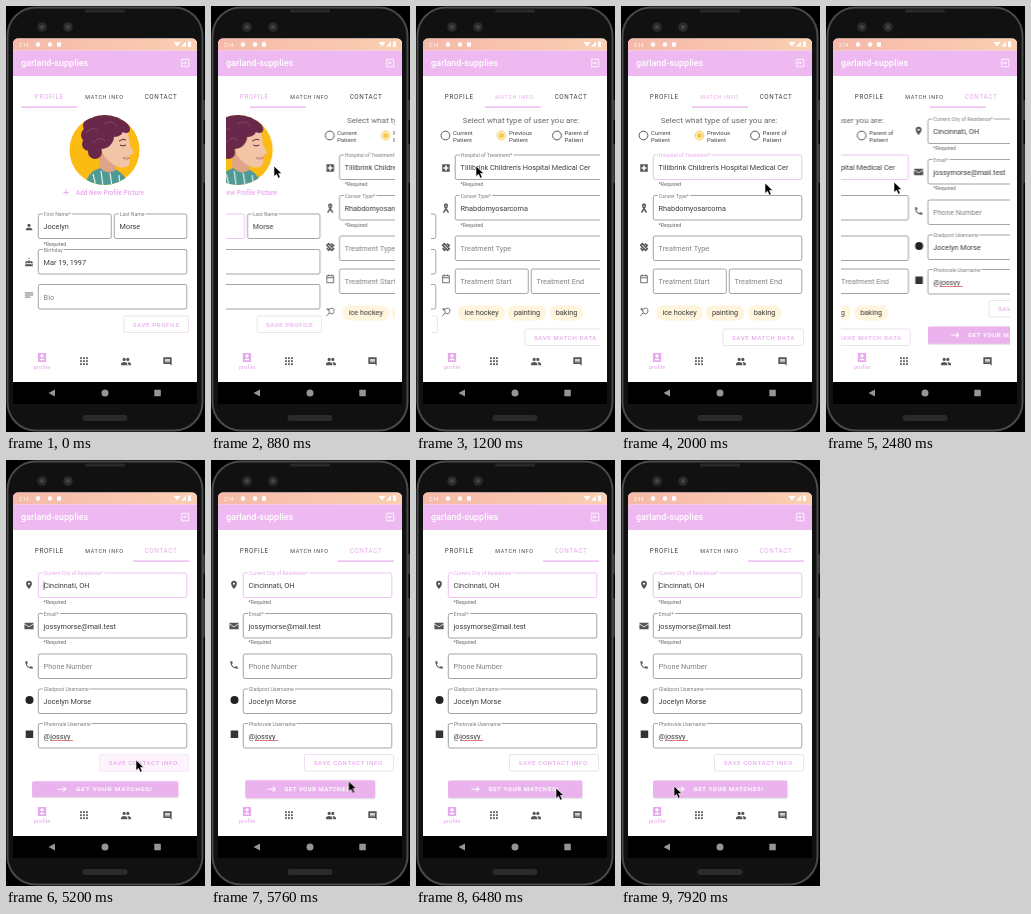
An HTML page that plays this animation: 199 px wide and 426 px high, repeating every 8000 ms.

```html
<!DOCTYPE html>
<html lang="en">
<head>
<meta charset="utf-8">
<title>Profile set-up</title>
<style>
html, body { margin: 0; width: 100%; height: 100%; overflow: hidden; background: #000; }
svg { display: block; width: 100%; height: 100%; font-family: Roboto, sans-serif; }
:root { --pink: #e7a9ec; --dark: #444; --line: #7d7d7d; }

/* One percent of the loop is 80 ms. */
.pages, .bar, .tab, .focus, .caret, .press, .band, .cursor { animation: 8s linear infinite; }
.pages { animation-name: swipe; }
.bar { animation-name: bar; }
.cursor { animation-name: cursor; }
.press { animation-name: press; opacity: 0; }
.band { animation-name: band; transform-origin: 99.2px 329px; }
.tab, .focus, .caret { animation-timing-function: step-end; }
.tab1 { animation-name: tab1; }
.tab2 { animation-name: tab2; }
.tab3 { animation-name: tab3; }
.focus1 { animation-name: focus1; }
.focus2 { animation-name: focus2; }
.focus3 { animation-name: focus3; }
.caret { animation-name: caret; }

@keyframes swipe {
  0%, 6% { transform: translateX(0); }
  8% { transform: translateX(-22px); }
  11% { transform: translateX(-71.5px); }
  12% { transform: translateX(-96px); }
  13% { transform: translateX(-132px); }
  14% { transform: translateX(-154px); }
  16%, 26% { transform: translateX(-168px); }
  28% { transform: translateX(-196px); }
  30% { transform: translateX(-236px); }
  31% { transform: translateX(-266px); }
  32% { transform: translateX(-300px); }
  33% { transform: translateX(-322px); }
  35%, 100% { transform: translateX(-336px); }
}
@keyframes bar {
  0%, 6% { transform: translateX(0); }
  8% { transform: translateX(7.3px); }
  11% { transform: translateX(23.8px); }
  12% { transform: translateX(32px); }
  13% { transform: translateX(44px); }
  14% { transform: translateX(51.3px); }
  16%, 26% { transform: translateX(56px); }
  28% { transform: translateX(65.3px); }
  30% { transform: translateX(78.7px); }
  31% { transform: translateX(88.7px); }
  32% { transform: translateX(100px); }
  33% { transform: translateX(107.3px); }
  35%, 100% { transform: translateX(112px); }
}
@keyframes cursor {
  0%, .99% { transform: translate(86px, 109px); opacity: 0; }
  1%, 2% { transform: translate(86px, 109px); opacity: 1; }
  4%, 5% { transform: translate(141px, 166px); }
  8% { transform: translate(93px, 162px); }
  11% { transform: translate(63px, 160px); }
  12%, 17% { transform: translate(60px, 160px); }
  23%, 26% { transform: translate(144px, 177px); }
  28% { transform: translate(108px, 177px); }
  30%, 36% { transform: translate(68px, 176px); }
  40%, 42% { transform: translate(84px, 196px); }
  48% { transform: translate(130px, 309px); }
  52%, 62% { transform: translate(130px, 306px); }
  64%, 69% { transform: translate(130px, 300px); }
  73%, 92% { transform: translate(140px, 328px); }
  99%, 100% { transform: translate(53px, 326px); }
}
@keyframes press { 0%, 63% { opacity: 0; } 65%, 67% { opacity: 1; } 70%, 100% { opacity: 0; } }
@keyframes band {
  0%, 63.7% { transform: none; }
  67.4% { transform: scale(1.25, .75); }
  68.7% { transform: scale(.75, 1.25); }
  70% { transform: scale(1.15, .85); }
  71.8% { transform: scale(.95, 1.05); }
  73% { transform: scale(1.05, .95); }
  76.2%, 100% { transform: none; }
}
@keyframes tab1 { 0% { fill: var(--pink); } 12%, 100% { fill: var(--dark); } }
@keyframes tab2 { 0% { fill: var(--dark); } 12% { fill: var(--pink); } 31%, 100% { fill: var(--dark); } }
@keyframes tab3 { 0% { fill: var(--dark); } 31%, 100% { fill: var(--pink); } }
@keyframes focus1 { 0% { color: var(--line); } 1%, 100% { color: var(--pink); } }
@keyframes focus2 { 0% { color: var(--line); } 17%, 100% { color: var(--pink); } }
@keyframes focus3 { 0% { color: var(--line); } 36%, 100% { color: var(--pink); } }
@keyframes caret {
  0% { opacity: 0; } 36% { opacity: 1; } 42% { opacity: 0; } 49% { opacity: 1; }
  55% { opacity: 0; } 61% { opacity: 1; } 67.5% { opacity: 0; } 73.5% { opacity: 1; }
  80% { opacity: 0; } 86% { opacity: 1; } 92.5% { opacity: 0; } 98.5%, 100% { opacity: 1; }
}

.field { color: var(--line); }
.box { fill: none; stroke: currentColor; stroke-width: .7; }
.label { font-size: 5.1px; fill: currentColor; stroke: #fff; stroke-width: 2.5px; paint-order: stroke; }
.value { font-size: 7.3px; fill: #3a3a3a; }
.hint { fill: #808080; }
.note { font-size: 5.2px; fill: #666; }
.small { font-size: 6px; fill: #444; }
.tab { font-size: 6.3px; letter-spacing: .65px; text-anchor: middle; }
.tab2 { font-size: 5.4px; }
.button { font-size: 6.1px; font-weight: 500; letter-spacing: .6px; text-anchor: middle; fill: var(--pink); }
.icon { fill: #555; }
.stroke { fill: none; stroke: #555; stroke-width: 2; }
.bold { stroke-width: 3.6; }
</style>
</head>
<body>
<script>
const text = (x, y, cls, str, extra = '') => `<text x="${x}" y="${y}" class="${cls}" ${extra}>${str}</text>`;
const rect = (x, y, w, h, fill, r = 0, extra = '') =>
  `<rect x="${x}" y="${y}" width="${w}" height="${h}" rx="${r}" fill="${fill}" ${extra}/>`;
const circle = (x, y, r, fill, extra = '') => `<circle cx="${x}" cy="${y}" r="${r}" fill="${fill}" ${extra}/>`;
const icon = (x, y, d, cls = 'icon', size = 10) =>
  `<path class="${cls}" d="${d}" fill-rule="evenodd" transform="translate(${x - size / 2} ${y - size / 2}) scale(${size / 24})"/>`;

// Outlined input; without a value the label is shown as a placeholder.
const field = (x, y, w, label, value = '', focus = '') => `<g class="field ${focus}">
  <rect class="box" x="${x}" y="${y}" width="${w}" height="24.5" rx="1.8"/>
  ${value ? text(x + 5.5, y + 2.2, 'label', label) + text(x + 5.3, y + 15.3, 'value', value)
          : text(x + 5.3, y + 15, 'value hint', label)}</g>`;
const required = y => text(37.5, y, 'note', '*Required');
const outlineButton = (x, y, label, press = '') => `
  ${rect(x, y, 182.5 - x, 16.5, '#fff', 1.5, 'stroke="#ecd9ee" stroke-width=".8"')}${press}
  ${text((x + 183) / 2, y + 10.6, 'button', label)}`;
const radio = (x, first, on) => `
  ${circle(x, 129.5, 4.4, on ? '#fff3cc' : '#fff', `stroke="${on ? '#f7c948' : '#444'}" stroke-width=".9"`)}
  ${on ? circle(x, 129.5, 2.6, '#f7c948') : ''}
  ${text(x + 7.5, 128.5, 'small', first)}${text(x + 7.5, 135.8, 'small', 'Patient')}`;
const chip = (x, w, label) => rect(x, 299.5, w, 15, '#fff4dc', 6) +
  text(x + w / 2, 309.3, 'value', label, 'text-anchor="middle"');

const glyph = {
  person: 'M12 12a4 4 0 1 0 0-8 4 4 0 0 0 0 8zm0 2c-2.7 0-8 1.3-8 4v2h16v-2c0-2.7-5.3-4-8-4z',
  cake: 'M3 22v-5q3 2 6-1 3 3 6 0 3 3 6 1v5zM3 15v-2q0-3 3-3h5V7h2v3h5q3 0 3 3v2q-3 2-6-2-3 4-6 0-3 4-6 2zM12 1l2 4h-4z',
  lines: 'M2 7h20M2 12h20M2 17h13',
  hospital: 'M3 3h18v18H3zM10 6v4H6v4h4v4h4v-4h4v-4h-4V6z',
  ribbon: 'M6 23L14 10Q17 3 12 3T10 10L18 23',
  bandage: 'M4 8l4-4 12 12-4 4zM14 4l6 4-4 4M4 14l4 6 4-4',
  calendar: 'M4 4h16v17H4zM4 9h16M8 1v4M16 1v4',
  racket: 'M3 22L10 14M10 14Q7 4 15 3T21 11 10 14M5 4h3v3H5z',
  pin: 'M12 2a7 7 0 0 0-7 7c0 5.2 7 13 7 13s7-7.8 7-13a7 7 0 0 0-7-7zm0 9.5a2.5 2.5 0 1 1 0-5 2.5 2.5 0 0 1 0 5z',
  mail: 'M1 4h22v2L12 13 1 6zM1 8l11 7 11-7v12H1z',
  phone: 'M3 3h5l1 5-2.5 3q2 4 6.5 6.5l3-2.5 5 1v5Q4 21 3 3z',
  exit: 'M4 9V3h17v18H4v-6M1 12h14M11 8l4 4-4 4',
  card: 'M3 2h18v20H3zM12 5a3.5 3.5 0 1 0 .1 0zM6 18h12q-1-4-6-4t-6 4z',
  people: 'M8 11a3.5 3.5 0 1 0 0-7 3.5 3.5 0 0 0 0 7zm8 0a3.5 3.5 0 1 0 0-7 3.5 3.5 0 0 0 0 7zM1 20v-3q1-4 7-4t7 4v3zM17 20v-3q0-2-2-4 7 0 8 4v3z',
  chat: 'M2 2h20v20l-4-4H2zM6 6v2h12V6zM6 9v2h12V9zM6 12v2h12v-2z'
};
const left = (y, name, cls) => icon(23, y, glyph[name], cls);

const curls = [[79, 129, 7], [82, 120, 8], [91, 114, 8], [102, 113, 8], [112, 117, 8], [80, 138, 7],
  [86, 146, 7], [92, 130, 13], [106, 122, 9], [117, 123, 4]];
const avatar = `<g clip-path="url(#face)">
  ${rect(63, 108, 72, 72, '#fbbb12')}
  <g transform="translate(3)">
  <path d="M76 180Q78 166 91 162L108 164Q118 170 119 180z" fill="#4f9a94"/>
  <path d="M84 168l3 12M92 165l2 15M101 167l2 13M110 169l1 11" stroke="#e5efe4" stroke-width="1.2"/>
  <path d="M90 145V161Q98 170 107 164L106 158z" fill="#dda486"/>
  <path d="M94 126H119L121 139 125 147 121 149 121 157Q119 163 110 161 98 157 93 146z" fill="#f1c5a5"/>
  ${curls.map(([x, y, r]) => circle(x, y, r, '#69284a')).join('')}
  <path d="M77 127q6-7 11-3M84 137q7-8 12-2M95 118q8-5 13 2" fill="none" stroke="#8b4263" stroke-width="1"/>
  ${circle(97, 146, 3, '#f1c5a5')}
  <path d="M111 139q3 2 6 0M110 135q4-3 7-1" fill="none" stroke="#54283b" stroke-width="1"/>
  <path d="M114 152q3 3 7 0z" fill="#fff" stroke="#b95550" stroke-width=".7"/></g></g>`;

const profilePage = `
  ${avatar}
  ${text(57, 189.5, '', '+', 'font-size="11" fill="#e7a9ec"')}
  ${text(70, 189, '', 'Add New Profile Picture', 'font-size="6.4" font-weight="500" fill="#e7a9ec"')}
  ${left(221, 'person')}${left(256, 'cake')}${left(289, 'lines', 'stroke')}
  ${field(32.3, 208, 73, 'First Name*', 'Jocelyn', 'focus focus1')}
  ${field(108.3, 208, 72.5, 'Last Name', 'Morse')}
  ${required(239.5)}
  ${field(32.3, 243.5, 148.5, 'Birthday', 'Mar 19, 1997')}
  ${field(32.3, 278.5, 148.5, 'Bio')}
  ${outlineButton(118, 310, 'SAVE PROFILE')}`;

const matchPage = `
  ${text(98, 116.5, '', 'Select what type of user you are:', 'font-size="8.1" fill="#666" text-anchor="middle"')}
  ${radio(22.5, 'Current')}${radio(78.5, 'Previous', true)}${radio(134, 'Parent of')}
  ${left(162, 'hospital')}${left(202, 'ribbon', 'stroke bold')}
  ${left(241, 'bandage', 'stroke bold')}${left(273, 'calendar', 'stroke')}${left(306, 'racket', 'stroke')}
  ${field(32.3, 149, 148.5, 'Hospital of Treatment*', "Tillibrink Children's Hospital Medical Cer", 'focus focus2')}
  ${required(180)}
  ${field(32.3, 189.5, 148.5, 'Cancer Type*', 'Rhabdomyosarcoma')}
  ${required(220.5)}
  ${field(32.3, 230, 148.5, 'Treatment Type')}
  ${field(32.3, 263, 73, 'Treatment Start')}${field(108.3, 263, 72.5, 'Treatment End')}
  ${chip(35.5, 46, 'ice hockey')}${chip(85, 38, 'painting')}${chip(127, 33, 'baking')}
  ${outlineButton(102, 323, 'SAVE MATCH DATA')}`;

const contactPage = `
  ${left(125, 'pin', 'icon')}${left(166, 'mail')}${left(205, 'phone')}
  ${circle(23.5, 240, 4, '#222')}${rect(19.7, 270.5, 7.5, 7.5, '#333')}
  ${field(32.3, 113, 148.5, 'Current City of Residence*', 'Cincinnati, OH', 'focus focus3')}
  ${rect(37.6, 121.5, .8, 8.5, '#555', 0, 'class="caret"')}
  ${required(143.5)}
  ${field(32.3, 153.5, 148.5, 'Email*', 'jossymorse@mail.test')}
  ${required(184)}
  ${field(32.3, 194, 148.5, 'Phone Number')}
  ${field(32.3, 229, 148.5, 'Gladpost Username', 'Jocelyn Morse')}
  ${field(32.3, 263.5, 148.5, 'Photovale Username', '@jossyy')}
  <path d="M45 280.5H67" stroke="#d86b6b" stroke-width=".9"/>
  ${outlineButton(93.5, 294.5, 'SAVE CONTACT INFO.', rect(93.5, 294.5, 89, 16.5, '#fcf3fc', 1.5, 'class="press"'))}
  <g class="band">
  ${rect(32, 321.2, 134.5, 17.5, '#ddd', 2)}
  ${rect(32, 320.3, 134.5, 17.5, '#ebb3ee', 2)}
  <path d="M55.5 329H63M60.5 326.5L63 329 60.5 331.5" fill="none" stroke="#fff" stroke-width="1"/>
  ${text(107.5, 331.4, 'button', 'GET YOUR MATCHES!', 'style="fill:#fff;font-weight:700"')}
  </g>`;

const grid = [0, 1, 2].flatMap(r => [0, 1, 2].map(c => rect(74 + c * 3, 351.2 + r * 3, 1.9, 1.9, '#666'))).join('');

document.body.innerHTML = `<svg viewBox="0 0 199 426" preserveAspectRatio="none">
  <defs>
    <clipPath id="face"><circle cx="98.5" cy="144" r="35"/></clipPath>
    <clipPath id="view"><rect x="15" y="103" width="168.5" height="239"/></clipPath>
    <clipPath id="screen"><path d="M7 376V38q0-5.500 5.500-5.500H185.500q5.500 0 5.500 5.500V376z"/></clipPath>
    <linearGradient id="status"><stop stop-color="#f6b9a9"/><stop offset="1" stop-color="#fbcfb2"/></linearGradient>
  </defs>
  ${rect(196, 94, 3, 20, '#333', 1)}${rect(196, 138, 3, 39, '#333', 1)}
  ${rect(.5, .5, 197, 425, '#4a4a4c', 29)}
  ${rect(2.5, 2.5, 193, 421, '#111', 27)}
  ${rect(79, 3.5, 40, 3, '#29292b', 1.5)}
  ${[36, 62].map(x => circle(x, 21, 4.8, '#2b2b2e') + circle(x, 21, 2, '#46464a')).join('')}
  ${rect(76.5, 409, 45, 6, '#2b2b2d', 3)}
  <g clip-path="url(#screen)">
  ${rect(7, 32, 184, 344, '#fff')}
  ${rect(7, 32, 184, 12.5, 'url(#status)')}
  ${rect(7, 44.5, 184, 25.5, '#eeb8f0')}
  </g>
  ${text(13, 40.8, '', '2:14', 'font-size="5" fill="#fff"')}
  ${circle(32, 38.5, 2.2, '#fff')}${circle(44, 38.5, 2.2, '#fff')}${rect(51, 36.3, 4, 4.4, '#fff', 1)}
  <path d="M167.500 36h7l-3.500 4.500zM175 40.500h5v-5zM182 35.500h3v5.500h-3z" fill="#fff"/>
  ${text(15, 60.2, '', 'garland-supplies', 'font-size="9" font-weight="500" fill="#fff"')}
  ${icon(179, 57, glyph.exit, 'stroke" style="stroke:#fff')}
  ${text(43.3, 93.2, 'tab tab1', 'PROFILE')}${text(98.5, 92.8, 'tab tab2', 'MATCH INFO')}${text(155, 93.2, 'tab tab3', 'CONTACT')}
  ${rect(15, 100.5, 56, 1.2, '#e7a9ec', 0, 'class="bar"')}
  <g clip-path="url(#view)"><g class="pages">
    <g>${profilePage}</g>
    <g transform="translate(168)">${matchPage}</g>
    <g transform="translate(336)">${contactPage}</g>
  </g></g>
  ${icon(36, 351.5, glyph.card, 'icon" style="fill:#e7a9ec', 11)}
  ${text(36, 363.3, '', 'profile', 'font-size="6" fill="#e7a9ec" text-anchor="middle"')}
  ${grid}
  ${icon(120, 355.5, glyph.people, 'icon', 11)}
  ${icon(161.5, 355.5, glyph.chat, 'icon', 10)}
  ${rect(7, 376, 184, 22, '#000')}
  <path d="M49 383.500V390.500L42.500 387z" fill="#959595"/>${circle(99, 387, 3.5, '#959595')}${rect(148.3, 383.7, 6.5, 6.5, '#959595', .5)}
  <path class="cursor" d="M0 0V10.500L2.500 8.300 4.300 12.200 6.200 11.300 4.500 7.500H7.800z" fill="#000" stroke="#fff" stroke-width=".6"/>
</svg>`;
</script>
</body>
</html>
```
